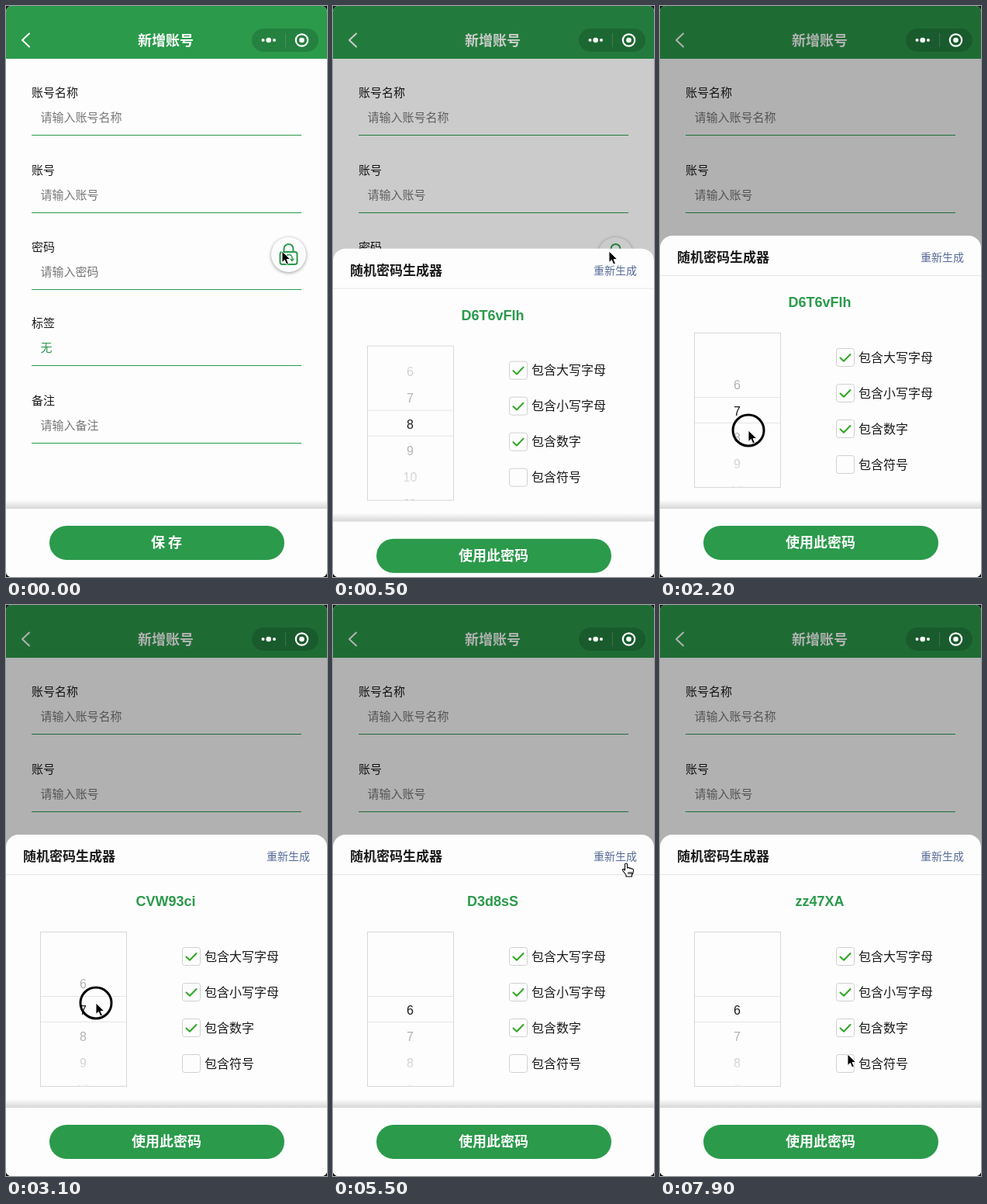
Animation of 414x736 px, one loop 8 s. Source, as an HTML page:

```html
<!DOCTYPE html>
<html lang="zh-CN">
<head>
<meta charset="utf-8">
<style>
  html, body { margin: 0; width: 100%; height: 100%; overflow: hidden; background: #111; }
  svg { display: block; width: 414px; height: 736px; }
  text { font-family: 'Noto Sans CJK SC', 'Noto Sans CJK', sans-serif; white-space: pre; }
  .latin { font-family: 'Liberation Sans', sans-serif; }
  .line { fill: none; stroke-linecap: round; stroke-linejoin: round; }
</style>
</head>
<body>
<svg id="stage" viewBox="0 0 414 736"></svg>
<script>
const LOOP = 8000, STEP = 100, ROW = 34;
const GREEN = '#2b9a4b', PAPER = '#fdfdfe', INK = '#1a1a1a', RULE = '#e6e6e8';

const text = (x, y, size, str, attrs = '') =>
  `<text x="${x}" y="${y + size * 0.37}" font-size="${size}" fill="${INK}" ${attrs}>${str}</text>`;
const rect = (x, y, w, h, fill, attrs = '') =>
  `<rect x="${x}" y="${y}" width="${w}" height="${h}" fill="${fill}" ${attrs}/>`;
const line = (d, color, width) =>
  `<path class="line" d="${d}" stroke="${color}" stroke-width="${width}"/>`;

const field = ([y, label, value]) =>
  text(33, y, 15, label) +
  text(44.5, y + 32.7, 15, value, `style="fill:${value === '无' ? GREEN : '#777'}"`) +
  rect(33, y + 55, 348, 1, GREEN);

const footer = label =>
  rect(0, 637, 414, 11, 'url(#shade)') + rect(0, 648, 414, 88, PAPER) +
  rect(56, 670, 303, 44, GREEN, 'rx="22"') +
  text(207, 691.5, 18, label, 'text-anchor="middle" font-weight="700" style="fill:#fff"');

const option = (label, i) => {
  const y = 453 + i * 46;
  return rect(227.5, y - 11.5, 23, 23, PAPER, 'rx="3" stroke="#d0d0d0"') +
    (i < 3 ? line(`M232.5 ${y + 0.5}l4.5 4.3 8.500-8.800`, '#2fa823', 2) : '') +
    text(256, y - 0.3, 16, label);
};

const fields = [
  [111, '账号名称', '请输入账号名称'], [211, '账号', '请输入账号'],
  [310, '密码', '请输入密码'], [408, '标签', '无'], [508, '备注', '请输入备注']
];
const options = ['包含大写字母', '包含小写字母', '包含数字', '包含符号'];

document.getElementById('stage').innerHTML = `
<defs>
  <linearGradient id="shade" x2="0" y2="1"><stop stop-color="#d6d6d6" stop-opacity="0"/><stop offset="1" stop-color="#d6d6d6"/></linearGradient>
  <linearGradient id="fade" x2="0" y2="1"><stop stop-color="${PAPER}" stop-opacity=".95"/><stop offset="1" stop-color="${PAPER}" stop-opacity=".6"/></linearGradient>
  <clipPath id="window">${rect(0, 0, 414, 736, '#000', 'rx="7"')}</clipPath>
  <clipPath id="wheelBox">${rect(45, 422, 110, 198, '#000')}</clipPath>
</defs>
<g clip-path="url(#window)">
  ${rect(0, 0, 414, 736, PAPER)}
  ${fields.map(field).join('')}
  <circle cx="364.5" cy="320.5" r="22.5" fill="${PAPER}" style="filter:drop-shadow(0 1.5px 2px #0006)"/>
  ${rect(353.5, 317, 22, 16, 'none', `rx="3" stroke="${GREEN}" stroke-width="2"`)}
  ${line('M358.5 317v-4a6 6 0 0 1 12 0v4', GREEN, 2)}
  ${line('M361 324a4 4 0 0 1 8 1v3m-2.5-2 2.5 2.5 2-2.5', GREEN, 1.4)}
  ${footer('保 存')}
  ${rect(0, 0, 414, 68, GREEN)}
  ${line('M30 35.5l-9 8.5 9 8.5', '#fff', 2)}
  ${text(206, 44, 18, '新增账号', 'text-anchor="middle" font-weight="700" style="fill:#fff"')}
  ${rect(0, 0, 414, 736, '#000', 'id="overlay"')}
  ${rect(317, 29, 86, 30, '#000', 'rx="15" fill-opacity=".16"')}
  ${rect(360, 35, 1, 18, '#fff', 'opacity=".15"')}
  <g fill="#fff">
    <circle cx="331.5" cy="44" r="2"/><circle cx="338.7" cy="44" r="3.3"/><circle cx="346" cy="44" r="2"/>
    <circle cx="381.5" cy="44" r="3.3"/>
    <circle cx="381.5" cy="44" r="7.7" fill="none" stroke="#fff" stroke-width="2.2"/>
  </g>
  <g id="sheet">
    ${rect(0, 296, 414, 460, PAPER, 'rx="16"')}
    ${text(22, 323.7, 17, '随机密码生成器', 'font-weight="700"')}
    ${text(336, 323.7, 14, '重新生成', 'style="fill:#576b95"')}
    ${rect(0, 347, 414, 1, RULE)}
    ${text(206, 381.5, 18, '', `id="password" class="latin" text-anchor="middle" font-weight="700" style="fill:${GREEN}"`)}
    <g clip-path="url(#wheelBox)"><g id="wheel">
      ${[6, 7, 8, 9, 10, 11].map((n, i) => text(99.5, 522 + (i - 2) * ROW, 16, n, 'class="latin" text-anchor="middle"')).join('')}
    </g></g>
    ${rect(45, 422, 110, 82, 'url(#fade)')}
    ${rect(45, 538, 110, 82, 'url(#fade)', 'transform="rotate(180 100 579)"')}
    ${rect(44.5, 421.5, 111, 199, 'none', 'stroke="#d8d8d8"')}
    ${rect(45, 504, 110, 1, RULE)}${rect(45, 537, 110, 1, RULE)}
    ${options.map(option).join('')}
    ${footer('使用此密码')}
  </g>
  <g id="pointer">
    <circle id="ring" r="20" fill="none" stroke="#000" stroke-width="3"/>
    <path id="arrow" d="M0 0v14.5l3.4-3.1 2.4 5.6 2.6-1.1-2.4-5.4h4.7z" fill="#000" stroke="#fff" stroke-width=".9"/>
    <path id="hand" d="M-1.5 1q1.5-2 3 0v5q2-1.5 3 .5 2-1 2.7.7 2.3-.6 2.3 1.8 0 4-2 5.5v2.5h-7.5v-2l-4.500-6q-.5-2 1.5-1.5l1.5 1.5zM3 11v3m2-3v3m2-3v3" fill="#fff" stroke="#000" stroke-width="1.1" stroke-linejoin="round"/>
  </g>
</g>`;

const el = id => document.getElementById(id);
const clamp = v => Math.min(1, Math.max(0, v));
const within = (t, spans) => spans.some(([a, b]) => t >= a && t < b);

// Eased interpolation through [time, ...values] keys.
function track(keys, t) {
  const i = keys.findIndex(k => k[0] > t);
  if (i < 0) return keys[keys.length - 1].slice(1);
  const a = keys[i - 1], b = keys[i], p = (t - a[0]) / (b[0] - a[0]), e = p * p * (3 - 2 * p);
  return a.slice(1).map((v, j) => v + (b[j + 1] - v) * e);
}

const pointerKeys = [
  [0, 356, 316], [700, 356, 316], [1200, 307, 506], [1700, 114, 513], [1900, 114, 513],
  [2200, 114, 547], [2500, 114, 549], [3000, 116, 513], [3100, 116, 513], [3500, 130, 553],
  [3800, 143, 519], [4300, 143, 519], [4900, 378, 333], [6700, 378, 333], [7500, 240, 586], [7900, 242, 579]
];
const wheelKeys = [[0, 0], [1900, 0], [2200, ROW], [3100, ROW], [3500, 78], [3800, 72], [4000, 2 * ROW]];
const presses = [[100, 300], [1900, 2400], [3100, 3500], [5700, 5900]];
const passwords = [[0, 'D6T6vFlh'], [2500, 'CVW93ci'], [4100, 'D3d8sS'], [5800, 'zz47XA']];

function draw(now) {
  const t = Math.floor(now / STEP) * STEP % LOOP;
  const open = clamp((t - 300) / 300);
  el('overlay').setAttribute('opacity', 0.3 * open);
  el('sheet').setAttribute('transform', `translate(0 ${450 * (1 - open) ** 3})`);
  el('password').textContent = passwords.filter(p => p[0] <= t).pop()[1];
  el('wheel').setAttribute('transform', `translate(0 ${track(wheelKeys, t)})`);
  el('pointer').setAttribute('transform', `translate(${track(pointerKeys, t)})`);
  const linked = within(t, [[4900, 6800]]);
  el('hand').setAttribute('opacity', +linked);
  el('arrow').setAttribute('opacity', +!linked);
  el('ring').setAttribute('opacity', +within(t, presses));
  requestAnimationFrame(draw);
}
draw(0);
</script>
</body>
</html>
```
